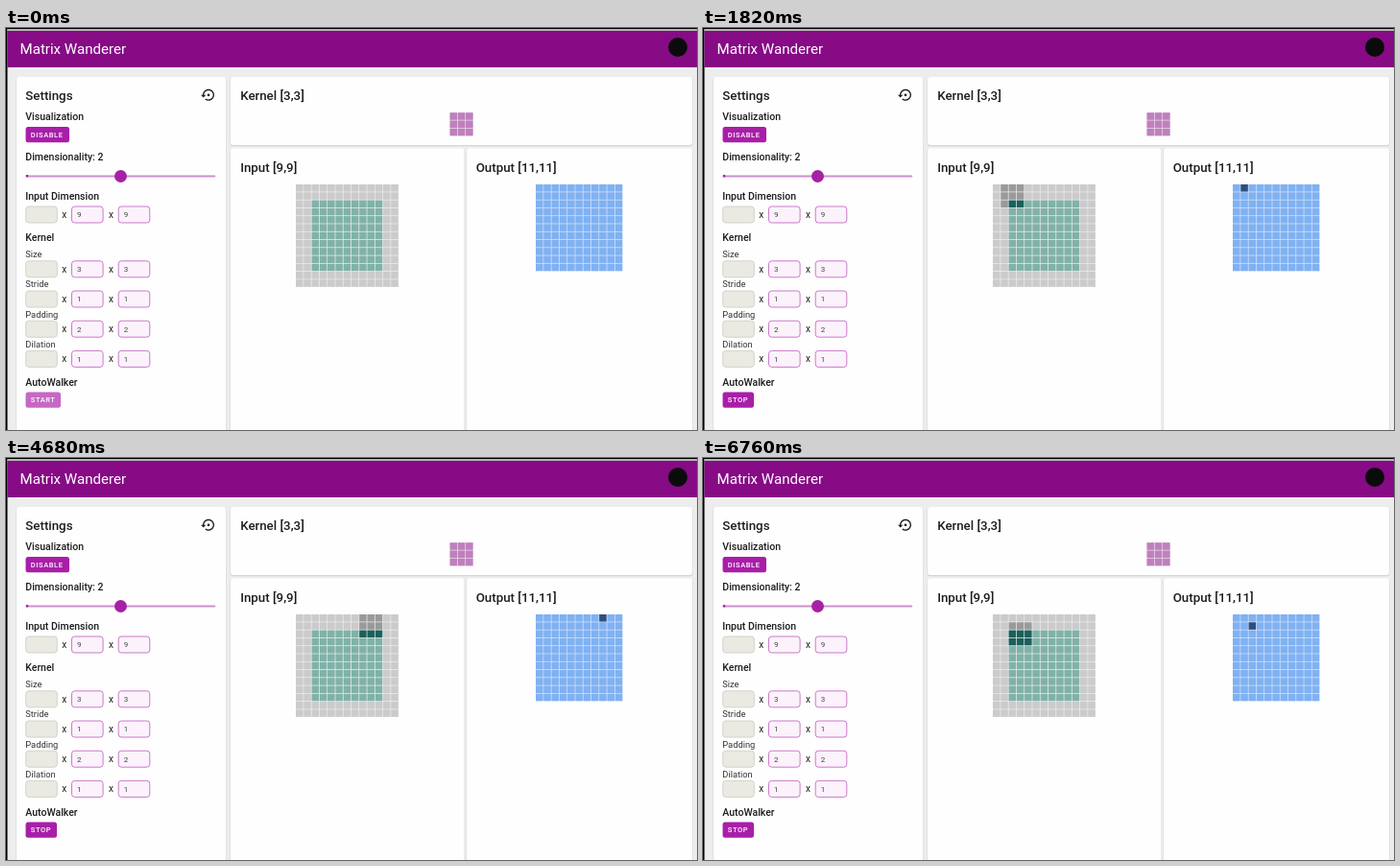
An HTML page that plays this animation: 720 by 419 pixels, repeating every 7150 ms.

```html
<!DOCTYPE html>
<html lang="en">
<head>
<meta charset="utf-8">
<title>Convolution walker</title>
<style>
  html, body { margin: 0; width: 100%; height: 100%; overflow: hidden; background: #000; }
  svg { display: block; width: 100vw; height: 100vh; }
  text { font-family: Roboto, Arial, sans-serif; fill: #1d1d1d; white-space: pre; }
  .h { font-size: 13.3px; font-weight: 500; }
  .s { font-size: 10.5px; font-weight: 500; }
  .l { font-size: 9.3px; fill: #333; }
  .x { font-size: 10px; }
  .n { font-size: 8px; fill: #444; }
  .b { font-size: 7.5px; font-weight: 500; letter-spacing: .6px; fill: #fff; }
  .tip { font-size: 7.6px; font-weight: 500; fill: #fff; }
  .title { font-size: 15.1px; fill: #fff; }
</style>
</head>
<body>
<svg id="stage" viewBox="0 0 720 419" preserveAspectRatio="none"></svg>
<script>
const LOOP = 7150, PITCH = 8.27, CELL = 7.55;
const PURPLE = '#a91ea9', PALE = '#c668c5';
const GREY = '#cbcbcb', GREY_ON = '#9a9a9a';
const TEAL = '#80b2a8', TEAL_ON = '#1b605b';
const BLUE = '#80b1f2', BLUE_ON = '#2d4f80';
const STEPS = [1430, 1820, 2210, 2600, 2990, 3380, 3900, 4290, 4680, 5070, 5460, 5980, 6370, 6760];
const SIZE = 13, PAD = 2, OUT = 11;

const stage = document.getElementById('stage');

function add(tag, attrs, parent = stage) {
  const el = document.createElementNS('http://www.w3.org/2000/svg', tag);
  for (const key in attrs) el.setAttribute(key, attrs[key]);
  parent.appendChild(el);
  return el;
}

const rect = (x, y, width, height, fill, more = {}, parent = stage) =>
  add('rect', { x, y, width, height, fill, ...more }, parent);

function label(x, y, cls, str, parent = stage) {
  const el = add('text', { x, y, class: cls }, parent);
  el.textContent = str;
  return el;
}

function card(x, y, w, h) {
  rect(x - .5, y + .5, w + 1, h + .7, '#d6d6d6', { rx: 3 });
  rect(x, y, w, h, '#fefefe', { rx: 3 });
}

function grid(x, y, n, gap, color) {
  rect(x, y, n * PITCH - .5, n * PITCH - .5, gap);
  return Array.from({ length: n * n }, (_, i) =>
    rect(x + i % n * PITCH, y + Math.floor(i / n) * PITCH, CELL, CELL, color(i % n, Math.floor(i / n))));
}

function fields(y, value) {
  const box = (x, fill, stroke) => rect(x, y, 32.6, 17, fill, { rx: 3, stroke, 'stroke-width': 1 });
  box(20.7, '#eaeae2', '#d3d3ca');
  for (const x of [68.5, 117.2]) {
    label(x - 10.2, y + 11.8, 'x', 'x');
    box(x, '#fbf2fb', '#cb79ca');
    label(x + 5.6, y + 11.4, 'n', value);
  }
}

// Page frame and header
rect(1.5, 1, 719, 418, '#ededed');
rect(1.5, 1, 719, 2, '#b9b4b9');
rect(1.5, 3, 719, 38, '#860b85');
label(14.5, 27, 'title', 'Matrix Wanderer');
add('circle', { cx: 700, cy: 20, r: 10, fill: '#0b0b0b' });

card(11, 51, 218, 380);
card(234, 51, 481, 71);
card(234, 125.3, 243.5, 310);
card(480, 125.3, 235, 310);

// Settings
label(20.3, 74.8, 'h', 'Settings');
add('path', {
  transform: 'translate(203 61.8) scale(.667)', fill: '#1d1d1d',
  d: 'M14 12c0-1.1-.9-2-2-2s-2 .9-2 2 .9 2 2 2 2-.9 2-2zm-2-9c-4.97 0-9 4.03-9 9H0l4 4 4-4H5c0-3.87 3.13-7 7-7s7 3.13 7 7-3.13 7-7 7c-1.51 0-2.91-.49-4.06-1.3l-1.42 1.44C8.04 20.3 9.94 21 12 21c4.97 0 9-4.03 9-9s-4.03-9-9-9z'
});
label(20.3, 95.7, 's', 'Visualization');
rect(20.5, 103, 45.5, 16.3, PURPLE, { rx: 2.5 });
label(25.8, 113.9, 'b', 'DISABLE');
label(20.3, 137.6, 's', 'Dimensionality: 2');
rect(20.7, 153.4, 197.6, 2, '#cf8fd0', { rx: 1 });
rect(20.7, 153, 2.6, 2.6, PURPLE, { rx: 1 });
add('circle', { cx: 119.5, cy: 154.5, r: 6.5, fill: '#a522a5' });
label(20.3, 178.6, 's', 'Input Dimension');
fields(186, '9');
label(20.3, 222, 's', 'Kernel');
[['Size', 1, '3'], ['Stride', 2, '1'], ['Padding', 3, '2'], ['Dilation', 4, '1']].forEach(([name, row, value]) => {
  const y = 211.6 + row * 31.2;
  label(20.3, y - 3.6, 'l', name);
  fields(y, value);
});
label(20.3, 372.6, 's', 'AutoWalker');
const button = rect(20.5, 379.5, 36.5, 16.3, PALE, { rx: 2.5 });
const buttonText = label(25.8, 390.4, 'b', 'START');

// Matrices
const padded = (c, r) => Math.min(c, r) < PAD || Math.max(c, r) >= SIZE - PAD;
const inputColor = (c, r) => padded(c, r) ? GREY : TEAL;
label(244.2, 74.8, 'h', 'Kernel [3,3]');
grid(462.5, 88.2, 3, '#ecdcec', () => '#bf80bd');
label(244.2, 149.6, 'h', 'Input [9,9]');
const input = grid(302, 163, SIZE, '#ededed', inputColor);
label(489.7, 149.6, 'h', 'Output [11,11]');
const output = grid(552, 163, OUT, '#d5e5fa', () => BLUE);

const tip = add('g', {});
rect(56, 378.3, 282, 21.8, '#737373', { rx: 2.5 }, tip);
label(61, 391.6, 'tip', 'autoWalker will be automatically stopped while you hover on the input or output.', tip);

function tipOpacity(t) {
  if (t < 780 || t >= 1430) return 0;
  if (t < 910) return .5;
  return t < 1300 ? 1 : .5;
}

function draw(t) {
  const running = t >= 1040;
  button.setAttribute('fill', running ? PURPLE : PALE);
  button.setAttribute('width', running ? 32.5 : 36.5);
  buttonText.textContent = running ? 'STOP' : 'START';
  tip.setAttribute('opacity', tipOpacity(t));

  const step = STEPS.filter(at => t >= at).length - 1;
  const col = step % OUT, row = Math.floor(step / OUT);
  input.forEach((cell, i) => {
    const c = i % SIZE, r = Math.floor(i / SIZE);
    const on = step >= 0 && c >= col && c < col + 3 && r >= row && r < row + 3;
    cell.setAttribute('fill', !on ? inputColor(c, r) : padded(c, r) ? GREY_ON : TEAL_ON);
  });
  output.forEach((cell, i) => cell.setAttribute('fill', i === step ? BLUE_ON : BLUE));
}

const start = performance.now();
function tick() {
  draw((performance.now() - start) % LOOP);
  requestAnimationFrame(tick);
}
draw(0);
requestAnimationFrame(tick);
</script>
</body>
</html>
```
